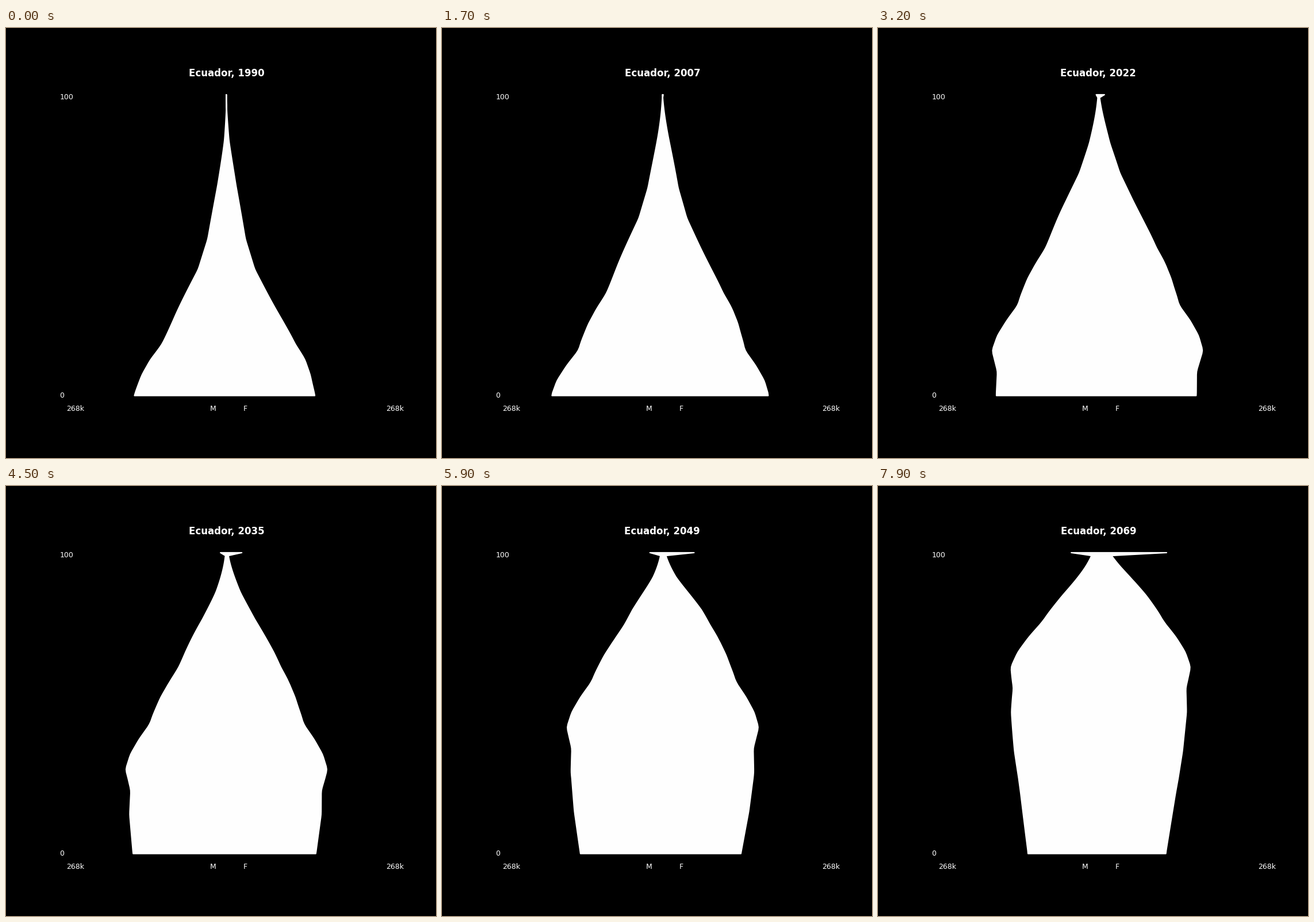
Animation of 748x748 px, one loop 8 s. Source, as a matplotlib script:

```python
import numpy as np
import matplotlib.pyplot as plt
from matplotlib.animation import FuncAnimation
from matplotlib.patches import Polygon

SIZE, DPI = 748, 100
FIRST, FRAMES, INTERVAL = 1990, 80, 100
LAST = FIRST + FRAMES - 1
MID, BASE, STEP = 383.35, 639.54, 5.236   # centre x, y of age 0, pixels per year
EDGE = 0.8                                # outline outside the shape
AGES = np.arange(100)

# Cohort size by year of birth, as half width in pixels
COHORTS = [(1890, 3), (1905, 7.5), (1920, 18.5), (1938, 34), (1948, 50),
           (1953, 63.5), (1963, 90.5), (1973, 117), (1978, 135), (1983, 147),
           (1989, 156.5), (1992, 160), (1997, 181.5), (2002, 199), (2007, 208.5),
           (2014, 197), (2022, 198), (2035, 189), (2049, 174), (2069, 154.7)]
# Share of people lost to emigration since the first year (log scale)
LEAVING = [(1990, 0), (1999, 0.06), (2014, 0.125), (2022, 0.125),
           (2049, 0.215), (2069, 0.25)]

births = np.arange(FIRST - 101, LAST + 2)
sizes = np.interp(births, *zip(*COHORTS))
sizes[1:-1] = (sizes[:-2] + 2 * sizes[1:-1] + sizes[2:]) / 4


def half_widths(year):
    """Left (male) and right (female) half width at every age."""
    born = year - AGES
    leaving = np.interp(year, *zip(*LEAVING))
    leaving *= np.interp(born, [1978, 1992], [1.4, 1])
    frailty = np.clip((1995 - born) / 27, 1, 1.4)
    deaths = 7.2e-5 * frailty * np.exp(0.1 * AGES)
    mean = np.interp(born, births, sizes) * np.exp(-leaving - deaths)

    # More boys at birth, more women in old age and around one generation
    skew = (-0.021 * (1 - np.minimum(AGES / 25, 1)) + 0.28 * (AGES / 100) ** 5
            + 0.04 * np.exp(-((born - 1972) / 10) ** 2))

    # The open 100+ group grows on its own
    rise = ((year - FIRST) / (LAST - FIRST)) ** 2.6
    left = np.append(mean * (1 - skew), 48 * rise)
    right = np.append(mean * (1 + skew), 119.5 * rise)
    return np.maximum(left - EDGE, 0), np.maximum(right - EDGE, 0)


def outline(year):
    y = BASE - STEP * np.arange(101)
    left, right = half_widths(year)
    return np.r_[np.c_[MID - left, y], np.c_[MID + right, y][::-1]]


fig = plt.figure(figsize=(SIZE / DPI, SIZE / DPI), dpi=DPI, facecolor="black")
ax = fig.add_axes([0, 0, 1, 1])
ax.set(xlim=(0, SIZE), ylim=(SIZE, 0))
ax.axis("off")

shape = ax.add_patch(Polygon(outline(FIRST), closed=True, facecolor="#fefefe",
                             edgecolor="white", linewidth=1.5, joinstyle="round"))


def label(x, y, text, size=9, **kw):
    return ax.text(x, y, text, color="white", fontsize=size,
                   family="DejaVu Sans", va="baseline", **kw)


title = label(MID, 84, "", 12, weight="bold", ha="center")
for x, y, text in [(93.5, 124.3, "100"), (93.5, 642.7, "0"), (105.1, 665.7, "268k"),
                   (354.4, 665.7, "M"), (412.3, 665.7, "F"), (661.6, 665.7, "268k")]:
    label(x, y, text)


def update(i):
    year = FIRST + i
    shape.set_xy(outline(year))
    title.set_text(f"Ecuador, {year}")
    return shape, title


anim = FuncAnimation(fig, update, frames=FRAMES, interval=INTERVAL,
                     repeat=True, repeat_delay=0, blit=False)
plt.show()
```
